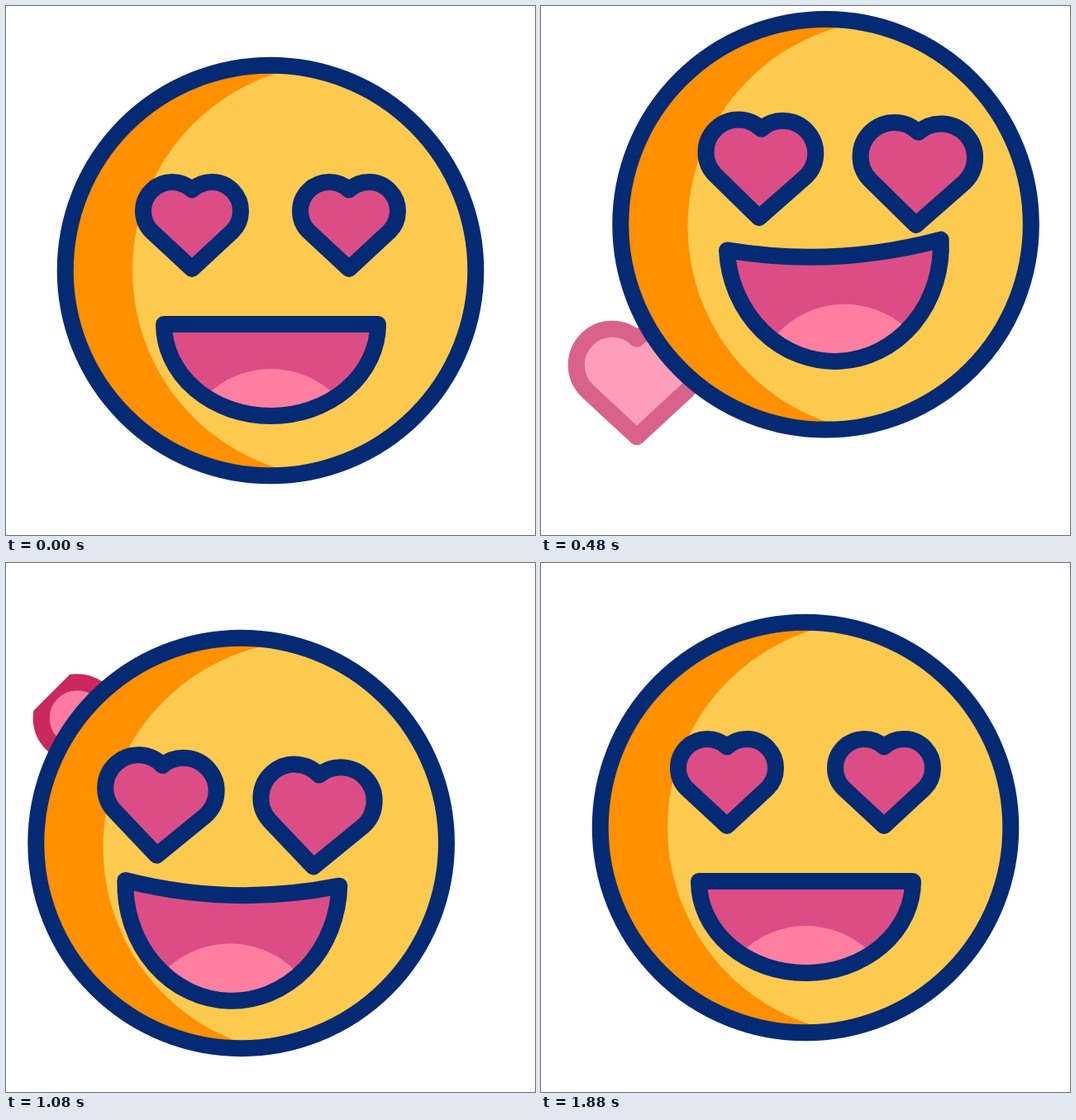
Recreate the animation shown at these times as an HTML page with a canvas. Size 640x640 px, loop 2 s.

```html
<!DOCTYPE html>
<html lang="en">
<head>
<meta charset="utf-8">
<title>Heart eyes</title>
<style>
  html, body { margin: 0; width: 100%; height: 100%; overflow: hidden; background: #fff; }
  canvas { display: block; width: 640px; height: 640px; }
</style>
</head>
<body>
<canvas id="stage" width="640" height="640"></canvas>
<script>
const ctx = document.getElementById('stage').getContext('2d');
const LOOP = 2000, STEP = 40, LAST = 1880, TAU = Math.PI * 2;
const NAVY = '#042a74', YELLOW = '#fdca50', ORANGE = '#ff9000';
const PINK = '#dc4d86', TONGUE = '#ff7fa1', ROSE = '#ca285e', BLUSH = '#fc7ba0';

// time, face x, face y, turn, feature x, feature y, left eye, right eye, mouth lift, mouth tilt
const KEYS = [
  [0, 0, 0, 0, 0, 0, 1, 1, 0, 0],
  [160, 16, -9, 9, 18, -6, 1.09, 1.1, 16, -1],
  [320, 37, -31, 17.1, 39, -14, 1.19, 1.21, 28, -2.6],
  [400, 40.5, -47, 12, 31, -14, 1.17, 1.2, 28, -3.5],
  [540, 6, -58.5, -6, 0, -10, 1.09, 1.15, 28, -5],
  [680, -30.5, -37, -15.6, -28, -4.6, 1.04, 1.1, 28, -5.8],
  [920, -54, 3, 8.8, -15, 12, 1.21, 1.21, 31, 0.6],
  [1120, -30, 20, 2, -5, 13, 1.12, 1.15, 29, -3],
  [1280, -13, 8.5, -5, 3.5, 12, 1.05, 1.1, 27.5, -5.6],
  [1560, 0, 0, -5.5, 0, -3, 1.32, 1.13, 1, 0],
  [1880, 0, 0, 0, 0, 0, 1, 1, 0, 0]
];

const slope = (i, c) => (KEYS[i + 1][c] - KEYS[i][c]) / (KEYS[i + 1][0] - KEYS[i][0]);

// Monotone tangent: flat at turning points
function tangent(i, c) {
  if (i === 0 || i === KEYS.length - 1) return 0;
  const a = slope(i - 1, c), b = slope(i, c);
  return a * b <= 0 ? 0 : 2 * a * b / (a + b);
}

function pose(t) {
  let i = 0;
  while (i < KEYS.length - 2 && t >= KEYS[i + 1][0]) i++;
  const a = KEYS[i], b = KEYS[i + 1], span = b[0] - a[0];
  const u = (t - a[0]) / span, v = 1 - u;
  return a.map((p, c) =>
    v * v * (1 + 2 * u) * p + u * u * (3 - 2 * u) * b[c] +
    span * u * v * (v * tangent(i, c) - u * tangent(i + 1, c)));
}

function outline(fill, stroke) {
  ctx.fillStyle = fill;
  ctx.strokeStyle = stroke;
  ctx.fill();
  ctx.stroke();
}

function disc(x, y, r, fill) {
  ctx.beginPath();
  ctx.arc(x, y, r, 0, TAU);
  ctx.fillStyle = fill;
  ctx.fill();
}

// The outline keeps its width while the heart grows
function heart(x, y, s, fill, stroke) {
  const r = 35 * s, d = 24 * s, notch = Math.acos(24 / 35);
  ctx.beginPath();
  ctx.moveTo(x, y + 70 * s);
  ctx.arc(x - d, y, r, Math.PI * 0.75, TAU - notch);
  ctx.arc(x + d, y, r, Math.PI + notch, Math.PI * 2.25);
  ctx.closePath();
  outline(fill, stroke);
}

function floater(t, x, start) {
  const y = 505 - 0.411 * (t - start);
  const alpha = Math.min(1, (505 - y) / 97, (y - 73) / 97);
  if (alpha <= 0) return;
  const size = 1.135 - 0.135 * Math.cos(TAU * ((t - start) / 600 + 0.11));
  const edge = 428;
  ctx.save();
  ctx.beginPath();
  ctx.moveTo(320, 320 - edge);
  ctx.lineTo(320 + edge, 320);
  ctx.lineTo(320, 320 + edge);
  ctx.lineTo(320 - edge, 320);
  ctx.clip();
  heart(x, y, size, BLUSH, ROSE);
  ctx.restore();
  // Fade the finished heart toward the white page
  ctx.fillStyle = `rgba(255,255,255,${1 - alpha})`;
  ctx.fillRect(x - 110, y - 80, 220, 200);
}

function mouthPath(lift) {
  ctx.beginPath();
  ctx.moveTo(-129.5, 0);
  ctx.quadraticCurveTo(0, lift, 129.5, 0);
  ctx.ellipse(0, 0, 129.5, 111 + 1.07 * lift, 0, 0, Math.PI);
  ctx.closePath();
}

function mouth(lift, tilt) {
  ctx.save();
  ctx.translate(0.5 + 0.9 * tilt, 65 - lift);
  ctx.rotate(tilt * Math.PI / 180);
  mouthPath(lift);
  ctx.fillStyle = PINK;
  ctx.fill();
  ctx.save();
  ctx.clip();
  disc(-tilt * 0.9, 165 + 0.65 * lift, 111, TONGUE);
  ctx.restore();
  mouthPath(lift);
  ctx.strokeStyle = NAVY;
  ctx.stroke();
  ctx.restore();
}

function face([, x, y, turn, dx, dy, left, right, lift, tilt]) {
  const angle = turn * Math.PI / 180;
  ctx.save();
  ctx.translate(320 + x, 320 + y);

  ctx.save();
  ctx.rotate(angle);
  disc(0, 0, 248, ORANGE);
  ctx.clip();
  disc(83.5, 0, 250.5, YELLOW);
  ctx.restore();

  ctx.beginPath();
  ctx.arc(0, 0, 248.3, 0, TAU);
  ctx.strokeStyle = NAVY;
  ctx.stroke();

  ctx.translate(dx, dy);
  ctx.rotate(angle);
  heart(-95, -72, left, PINK, NAVY);
  heart(95, -72, right, PINK, NAVY);
  mouth(lift, tilt);
  ctx.restore();
}

function draw(t) {
  ctx.fillStyle = '#fff';
  ctx.fillRect(0, 0, 640, 640);
  ctx.lineWidth = 20;
  ctx.lineJoin = 'round';
  floater(t, 116, 308);
  floater(t, 482, 28);
  face(pose(t));
}

const begin = performance.now();
function tick() {
  const t = (performance.now() - begin) % LOOP;
  draw(Math.min(LAST, Math.floor(t / STEP) * STEP));
  requestAnimationFrame(tick);
}
tick();
</script>
</body>
</html>
```
